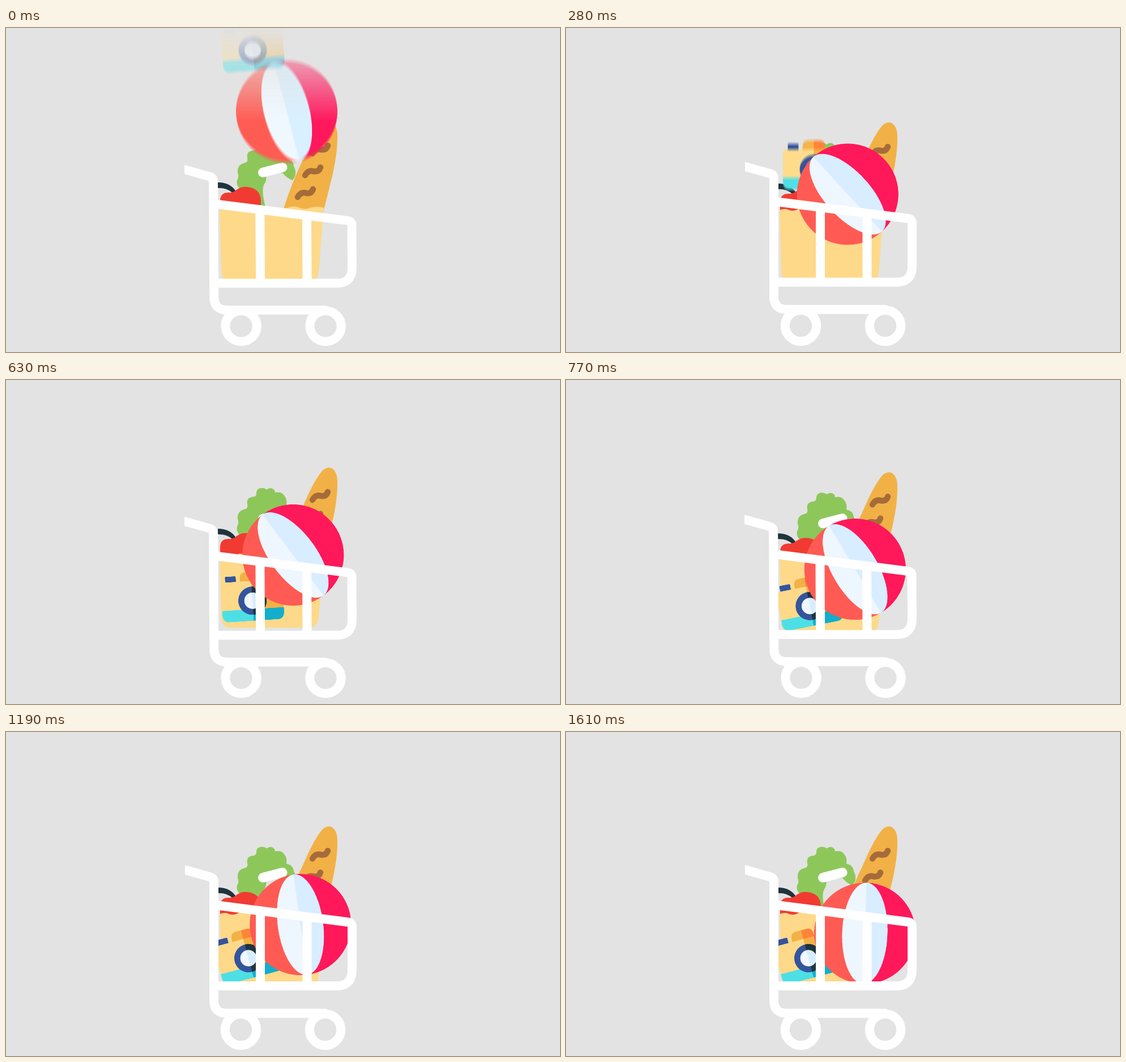
These frames come from a looping animation (978 by 573 pixels, 1.68 s). An HTML page with a canvas:

```html
<!DOCTYPE html>
<html lang="en">
<head>
<meta charset="utf-8">
<title>Shopping cart</title>
<style>
  html, body { margin: 0; width: 100%; height: 100%; overflow: hidden; background: #e3e3e3; }
  canvas { display: block; width: 978px; height: 573px; }
</style>
</head>
<body>
<canvas id="stage" width="978" height="573"></canvas>
<script>
const W = 978, H = 573, LOOP = 1680, STEP = 70, GROUND = 562;
const LANDING = 455; // when the camera hits the bag
const BG = '#e3e3e3', GOLD = '#f2b146', CREAM = '#fdd989', DARK = '#1f343c', NAVY = '#34549c';
const ctx = document.getElementById('stage').getContext('2d');

// Easing helpers over a time span.
const ramp = (t, from, to) => Math.min(1, Math.max(0, (t - from) / (to - from)));
const smooth = (t, from, to) => (1 - Math.cos(Math.PI * ramp(t, from, to))) / 2;
const bump = (t, from, to) => Math.sin(Math.PI * ramp(t, from, to));

// Everything in the bag is thrown up by the landing camera.
const toss = t => bump(t, LANDING, LANDING + 350);

function groceryHop(t) {
  const settle = -2 * Math.cos(Math.PI * t / 140) * (1 - ramp(t, 0, 280));
  return settle - 12 * toss(t);
}

function ballPose(t) {
  const roll = ramp(t, 140, 1610);
  const entry = 1 - ramp(t, 0, 140);
  return {
    x: 493 + 34.5 * roll * (1.3 - .3 * roll) + 2.5 * entry,
    y: 147.5 + 146.5 * ramp(t, 0, 175) + 45 * smooth(t, 490, 840) + 17 * smooth(t, 1120, 1470),
    angle: -42.5 + 28 * entry + 44.5 * smooth(t, 350, 1570),
    blur: 3.5 * (1 - ramp(t, 140, 210))
  };
}

function cameraPose(t) {
  const entry = 1 - ramp(t, 0, 140);
  const tip = smooth(t, 490, 910);
  return {
    x: 437.5 - 2 * entry - 9.5 * tip,
    y: 39 + 360 * ramp(t, 0, LANDING) ** 1.1 + tip - 9 * bump(t, 490, 770),
    angle: -5 * entry - 15 * tip,
    blur: 3 * (1 - ramp(t, 385, LANDING))
  };
}

function cartPose(t) {
  const recoil = since => Math.exp(-since / 180);
  const hit = t < 490 ? ramp(t, 385, 490) : recoil(t - 490);
  return {
    scale: 1 - .021 * recoil(t) - .043 * hit,
    lean: .006 * (1 - ramp(t, 0, 140) + bump(t, 490, 910))
  };
}

function fill(c, color, path) {
  c.fillStyle = color;
  c.fill(new Path2D(path));
}

function stroke(c, color, width, path) {
  c.strokeStyle = color;
  c.lineWidth = width;
  c.lineCap = c.lineJoin = 'round';
  c.stroke(new Path2D(path));
}

function makeCanvas(w, h) {
  const canvas = document.createElement('canvas');
  canvas.width = w;
  canvas.height = h;
  return canvas;
}

// Sprites are centred, drawn at double size.
const SPRITE = 200;
function makeSprite(draw) {
  const canvas = makeCanvas(SPRITE * 2, SPRITE * 2);
  const c = canvas.getContext('2d');
  c.setTransform(2, 0, 0, 2, SPRITE, SPRITE);
  draw(c);
  return canvas;
}

// An ellipse with differently coloured left and right halves.
function halves(c, rx, ry, left, right) {
  c.fillStyle = left;
  c.beginPath();
  c.ellipse(0, 0, rx, ry, 0, 0, Math.PI * 2);
  c.fill();
  c.fillStyle = right;
  c.beginPath();
  c.ellipse(0, 0, rx, ry, 0, -Math.PI / 2, Math.PI / 2);
  c.fill();
}

// The right side of a path and its mirror image on the left.
function mirrored(c, left, right, path) {
  fill(c, right, path);
  c.save();
  c.scale(-1, 1);
  fill(c, left, path);
  c.restore();
}

const ballSprite = makeSprite(c => {
  halves(c, 89.5, 89.5, '#ff5b54', '#ff185a');
  halves(c, 40, 89.5, '#eef6ff', '#d8edff');
});

const cameraSprite = makeSprite(c => {
  fill(c, NAVY, 'M-46 -33V-43Q-46 -45 -44 -45H-29Q-27 -45 -27 -43V-33Z');
  mirrored(c, GOLD, '#ff8438', 'M0 -51H10Q19 -51 20 -41V-34H0Z');
  mirrored(c, CREAM, GOLD, 'M0 -35H49Q54.500 -35 54.500 -29V16H0Z');
  mirrored(c, '#4ddfe6', '#12aecb', 'M0 15H54.500V24Q53 35.500 43 35.500H0Z');
  halves(c, 25, 25, NAVY, DARK);
  halves(c, 14.5, 14.5, '#f0f7ff', '#d8edff');
});

const layer = makeCanvas(W, H);
const layerCtx = layer.getContext('2d');

// Draws a sprite with vertical motion blur; veil hides it towards the stage top.
function drawMoving(sprite, { x, y, angle, blur }, veil) {
  const c = layerCtx, count = blur > 0 ? 4 : 1;
  c.clearRect(0, 0, W, H);
  c.globalCompositeOperation = 'lighter';
  c.globalAlpha = 1 / count;
  for (let i = 0; i < count; i++) {
    c.save();
    c.translate(x, count > 1 ? y + blur * (2 * i / (count - 1) - 1) : y);
    c.rotate(angle * Math.PI / 180);
    c.drawImage(sprite, -SPRITE / 2, -SPRITE / 2, SPRITE, SPRITE);
    c.restore();
  }
  c.globalAlpha = 1;
  if (veil > 0) {
    const mask = c.createLinearGradient(0, 0, 0, 165);
    mask.addColorStop(0, `rgba(0,0,0,${veil})`);
    mask.addColorStop(1, 'rgba(0,0,0,0)');
    c.globalCompositeOperation = 'destination-out';
    c.fillStyle = mask;
    c.fillRect(0, 0, W, H);
  }
  ctx.drawImage(layer, 0, 0);
}

function drawGroceries(hop) {
  ctx.save();
  ctx.translate(0, hop);
  // lettuce
  fill(ctx, '#8dc75a', `M440 320Q436 300 424 292Q405 286 408 271Q412 265 409 258
    Q408 244 420 241Q428 240 426 232Q424 221 434 219Q443 219 442 211
    Q443 203 452 203Q457 203 460 206Q465 202 470 204Q475 206 475 211
    Q486 209 491 216Q497 223 495 233Q507 235 508 246Q514 258 509 267
    L505 272L458 320Z`);
  fill(ctx, BG, 'M459 262Q461 270 456 278Q450 288 458 318H505V271Q495 267 488 258Z');
  stroke(ctx, '#fff', 17, 'M453.500 257.500L488 248.500');
  // baguette
  fill(ctx, GOLD, `M488 328Q503 278 527 229Q546 185 560 171Q568 165 575 168
    Q584 173 585 190Q586 225 573 276L560 328Z`);
  for (let i = 0; i < 3; i++)
    stroke(ctx, '#a56c3a', 10.5, `M${541 - 13 * i} ${224 + 38.5 * i}c4 -7 9 -9 15 -7c6 1 10 -1 12 -7`);
  // apple
  fill(ctx, DARK, 'M374 275Q396 275 406 291L399 293Q389 284 374 285Z');
  fill(ctx, '#f13b32', `M378 325V306Q379 293 393 293Q401 294 407 288Q416 282 425 283
    Q449 285 450 307V325Z`);
  // bag
  fill(ctx, CREAM, `M377 322Q387 318 394 322Q403 325 412 319Q440 324 470 319
    Q484 324 497 320Q508 315 518 320Q528 324 537 320Q549 316 561 320
    L552 432Q550 449 537 450H394Q381 449 380 432Z`);
  ctx.restore();
}

function drawCart({ scale, lean }) {
  ctx.save();
  ctx.transform(1, 0, lean, scale, -lean * 430, GROUND * (1 - scale));
  ctx.beginPath();
  ctx.rect(316, 0, 400, H);
  ctx.clip();
  stroke(ctx, '#fff', 16, `M300 239L360 256Q367 258 367 265V476Q368 497.500 390 497.500H563
    M367 305.500L604 336Q611 337 611 344V422Q610 449 584 449H367
    M449 316V449M531.500 327V449`);
  for (const x of [414.5, 563.5]) {
    ctx.beginPath();
    ctx.arc(x, 526.5, 27.7, 0, Math.PI * 2);
    ctx.fillStyle = BG;
    ctx.fill();
    ctx.stroke();
  }
  ctx.restore();
}

function render(now) {
  const t = Math.floor(now % LOOP / STEP) * STEP;
  const veil = 1 - ramp(t, 0, 175);
  ctx.fillStyle = BG;
  ctx.fillRect(0, 0, W, H);
  drawGroceries(groceryHop(t));
  drawMoving(cameraSprite, cameraPose(t), veil);
  drawMoving(ballSprite, ballPose(t), veil);
  drawCart(cartPose(t));
}

const start = performance.now();
function tick() {
  render(performance.now() - start);
  requestAnimationFrame(tick);
}
tick();
</script>
</body>
</html>
```
